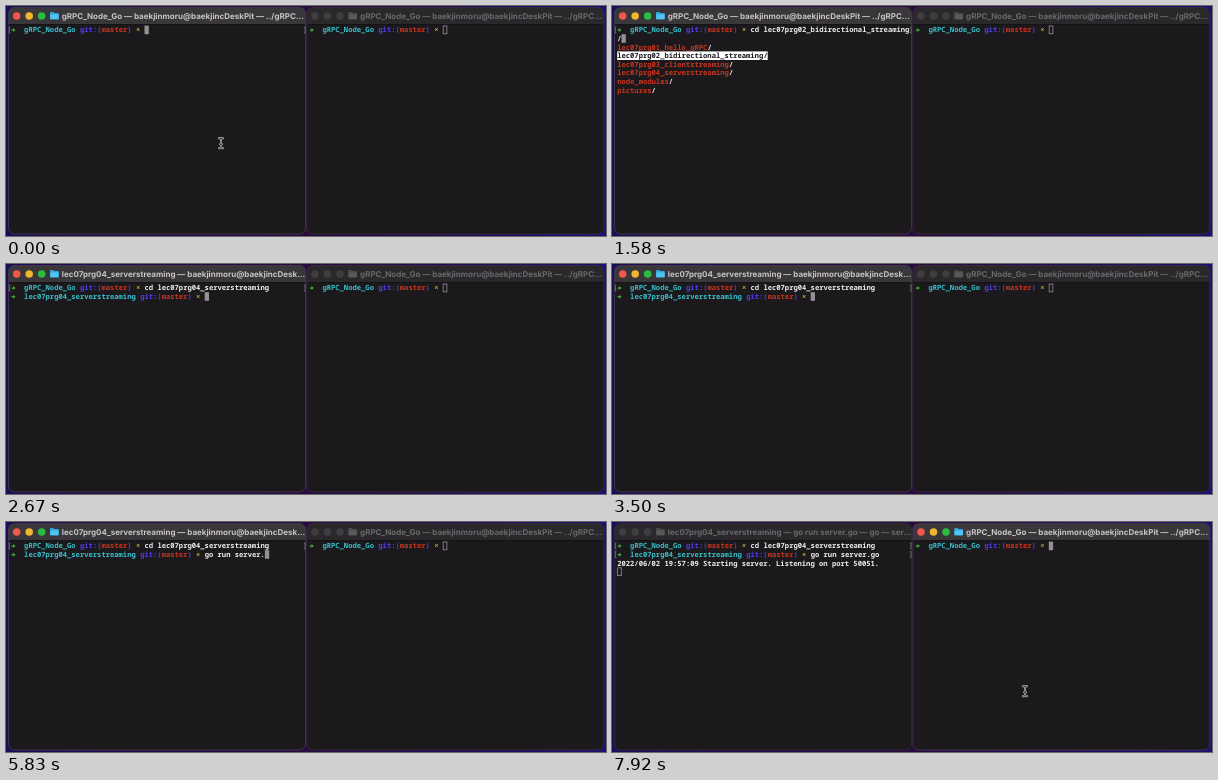
An HTML page with a canvas for the animation above (8000 ms loop, 600 px wide and 230 px high).

```html
<!DOCTYPE html>
<html lang="en">
<head>
<meta charset="utf-8">
<title>Two terminals</title>
<style>
  html, body { margin: 0; width: 100%; height: 100%; overflow: hidden; background: #180a3c; }
  canvas { display: block; width: 600px; height: 230px; }
</style>
</head>
<body>
<canvas id="stage"></canvas>
<script>
const W = 600, H = 230, LOOP = 8000, STEP = 1000 / 12;
const CELL = 4.3, ROW = 8.6, LEFT = 5.2, TOP = 19.6, COLS = 68;
const PANE = 298.3;
const MONO = 'bold 7.167px "Noto Sans Mono", "Liberation Mono", monospace';
const TITLE = 'bold 8px Inter, "Open Sans", sans-serif';
const C = {
  body: '#1b191b', white: '#efeeef', green: '#3fae35', cyan: '#38c0cc',
  blue: '#4f3df0', red: '#c9341f', yellow: '#b5b02c', block: '#939193', mark: '#79777a'
};

const HOST = 'baekjinmoru@baekjincDeskPit';
const ROOT = 'gRPC_Node_Go', DIR = 'lec07prg04_serverstreaming';
const FOLDERS = ['lec07prg01_hello_gRPC', 'lec07prg02_bidirectional_streaming',
  'lec07prg03_clientstreaming', DIR, 'node_modules', 'pictures'];

// Times in ms
const CD_KEYS = [300, 470, 640];
const TABS = [1130, 1380, 1640, 1890];
const MENU_ON = 900, ACCEPT = 2210, CD_RUN = 2460;
const RUN_KEYS = [3900, 4060, 4220, 4390, 4560, 4640, 4810, 4980,
  5060, 5220, 5310, 5470, 5560, 5720, 5890, 5980];
const GO_RUN = 6220, LINKED = 7060, LISTEN = 7220, SWITCH = 7480;
const MOVE = [6300, 6800];

const canvas = document.getElementById('stage');
const ctx = canvas.getContext('2d');
const dpr = window.devicePixelRatio || 1;
canvas.width = W * dpr;
canvas.height = H * dpr;

const count = (times, t) => times.filter(x => x <= t).length;
const colX = col => LEFT + col * CELL;
const rowY = row => TOP + row * ROW;

function box(x, y, w, h, color) {
  ctx.fillStyle = color;
  ctx.fillRect(x, y, w, h);
}

function disc(x, y, r, color) {
  ctx.fillStyle = color;
  ctx.beginPath();
  ctx.arc(x, y, r, 0, Math.PI * 2);
  ctx.fill();
}

// Prints at a cell and returns the column after the text.
function put(text, col, row, color = C.white) {
  ctx.font = MONO;
  ctx.fillStyle = color;
  ctx.fillText(text, colX(col), rowY(row) + 6.8);
  return col + text.length;
}

function caret(col, row, focused) {
  const x = colX(col), y = rowY(row);
  if (focused) return box(x, y, CELL, ROW, C.block);
  ctx.strokeStyle = C.block;
  ctx.lineWidth = 0.8;
  ctx.strokeRect(x + 0.4, y + 0.4, CELL - 0.6, ROW - 0.8);
}

function arrow(row) {
  const x = LEFT + 0.2, y = rowY(row) + 4.5;
  box(x, y - 0.6, 2.4, 1.2, C.green);
  ctx.beginPath();
  ctx.moveTo(x + 1.8, y - 2);
  ctx.lineTo(x + 4.2, y);
  ctx.lineTo(x + 1.8, y + 2);
  ctx.fill();
}

// Returns the column where the command begins.
function prompt(dir, row) {
  arrow(row);
  let col = put(dir, 3, row, C.cyan) + 1;
  col = put('git:(', col, row, C.blue);
  col = put('master', col, row, C.red);
  col = put(')', col, row, C.blue);
  return put('×', col + 1, row, C.yellow) + 1;
}

function brackets(row) {
  const y = rowY(row) + 1.2;
  for (const [x, dir] of [[3.3, 1], [299, -1]]) {
    box(x - 0.4, y, 0.8, 6.4, C.mark);
    for (const dy of [0, 5.7]) box(dir > 0 ? x : x - 1.2, y + dy, 1.2, 0.7, C.mark);
  }
}

function folder(focused, busy) {
  const tone = focused ? (busy ? '#2e91ad' : '#2fa4dc') : '#4c4a4d';
  const front = focused ? (busy ? '#3ba7bd' : '#52c4f2') : '#5a585b';
  ctx.fillStyle = tone;
  ctx.beginPath();
  ctx.roundRect(44, 6, 4, 3, 0.8);
  ctx.roundRect(44, 6.9, 8.8, 6.6, 0.9);
  ctx.fill();
  box(44.3, 8.4, 8.2, 4.7, front);
}

function frame(title, focused, busy) {
  ctx.fillStyle = C.body;
  ctx.beginPath();
  ctx.roundRect(2.5, 1.5, 297, 226.5, 6);
  ctx.fill();
  ctx.save();
  ctx.clip();
  box(2, 1, 298, 17.3, focused ? '#3a373a' : '#2a282b');
  box(2, 18.2, 298, 0.8, '#111012');
  ctx.restore();
  ctx.strokeStyle = focused ? '#453d49' : '#362f39';
  ctx.lineWidth = 0.8;
  ctx.stroke();

  ['#f2574e', '#efb62f', '#2bbd3f'].forEach((color, i) =>
    disc(10.7 + i * 12.5, 9.9, 3.75, focused ? color : '#403d41'));
  if (busy && focused) disc(10.7, 9.9, 1.3, '#7c1712');
  folder(focused, busy);
  ctx.font = TITLE;
  ctx.fillStyle = focused ? '#c6c4c6' : '#6a686b';
  ctx.fillText(title, 55.8, 12.9);
}

function menu(row, selected) {
  FOLDERS.forEach((name, i) => {
    const on = i === selected;
    if (on) box(LEFT, rowY(row + i), (name.length + 1) * CELL, ROW, '#fff');
    const col = put(name, 0, row + i, on ? C.body : C.red);
    put('/', col, row + i, on ? C.body : C.white);
  });
}

function cdLine(t, focused) {
  const start = prompt(ROOT, 0);
  if (t >= ACCEPT) {
    const end = put('cd ' + DIR, start, 0);
    if (t < CD_RUN) caret(end, 0, focused);
    return;
  }
  const pick = count(TABS, t) - 1;
  let text = 'cd '.slice(0, count(CD_KEYS, t));
  if (pick >= 0) text += FOLDERS[pick] + '/';
  const room = COLS - start;
  const rest = text.slice(room), wrapped = rest ? 1 : 0;
  put(text.slice(0, room), start, 0);
  put(rest, 0, 1);
  caret(wrapped ? rest.length : start + text.length, wrapped, focused);
  if (t >= MENU_ON) menu(1 + wrapped, pick);
}

function leftTitle(t) {
  if (t < CD_RUN) return `${ROOT} — ${HOST} — ../gRPC...`;
  if (t < GO_RUN) return `${DIR} — ${HOST.slice(0, -3)}...`;
  return `${DIR} — go run server.go — go — ${t < LINKED ? 'lin' : 'ser'}...`;
}

function leftPane(t) {
  const focused = t < SWITCH, busy = t >= GO_RUN;
  frame(leftTitle(t), focused, busy);
  brackets(0);
  cdLine(t, focused);
  if (t < CD_RUN) return;
  const start = prompt(DIR, 1);
  const end = put('go run server.go'.slice(0, count(RUN_KEYS, t)), start, 1);
  if (!busy) return caret(end, 1, focused);
  brackets(1);
  const listening = t >= LISTEN;
  if (listening) put('2022/06/02 19:57:09 Starting server. Listening on port 50051.', 0, 2);
  caret(0, listening ? 3 : 2, focused);
}

function rightPane(t) {
  const focused = t >= SWITCH;
  ctx.save();
  ctx.translate(PANE, 0);
  frame(`${ROOT} — ${HOST} — ../gRPC...`, focused, false);
  caret(prompt(ROOT, 0), 0, focused);
  ctx.restore();
}

function iBeam(x, y) {
  const path = new Path2D('M-2-5Q-.3-5 0-4.3Q.3-5 2-5M0-4.3V4.3M-2 5Q-.3 5 0 4.3Q.3 5 2 5M-1 1H1');
  ctx.save();
  ctx.translate(x, y);
  ctx.lineCap = 'round';
  for (const [width, color] of [[2, '#dcdbdc'], [0.8, '#111']]) {
    ctx.lineWidth = width;
    ctx.strokeStyle = color;
    ctx.stroke(path);
  }
  ctx.restore();
}

function pointer(x, y) {
  const path = new Path2D('M0 0V9L2.1 7.1L3.6 10.5L5.2 9.8L3.7 6.5H6.4Z');
  ctx.save();
  ctx.translate(x, y);
  ctx.lineJoin = 'round';
  ctx.lineWidth = 1.5;
  ctx.strokeStyle = '#f0eff0';
  ctx.stroke(path);
  ctx.fillStyle = '#0c0c0c';
  ctx.fill(path);
  ctx.restore();
}

function mouse(t) {
  if (t < CD_KEYS[0]) return iBeam(215, 137.3);
  if (t < MOVE[0]) return;
  const p = Math.min(1, (t - MOVE[0]) / (MOVE[1] - MOVE[0]));
  const e = p * p * (3 - 2 * p);
  const x = 215 + 193 * e, y = 137.3 + 31.2 * e;
  if (t >= SWITCH) iBeam(413, 169.3);
  else if (x < 299) iBeam(x, y);
  else pointer(x, y);
}

function wallpaper() {
  const g = ctx.createLinearGradient(0, 0, W, 0);
  g.addColorStop(0, '#1c0d58');
  g.addColorStop(0.5, '#2a0a40');
  g.addColorStop(1, '#1e0e78');
  ctx.fillStyle = g;
  ctx.fillRect(0, 0, W, H);
}

function draw(now) {
  const t = Math.floor((now % LOOP + 5) / STEP) * STEP;
  ctx.setTransform(dpr, 0, 0, dpr, 0, 0);
  ctx.textRendering = 'geometricPrecision';
  wallpaper();
  leftPane(t);
  rightPane(t);
  mouse(t);
}

let origin = null;
function tick(now) {
  origin ??= now;
  draw(now - origin);
  requestAnimationFrame(tick);
}
draw(0);
requestAnimationFrame(tick);
</script>
</body>
</html>
```
